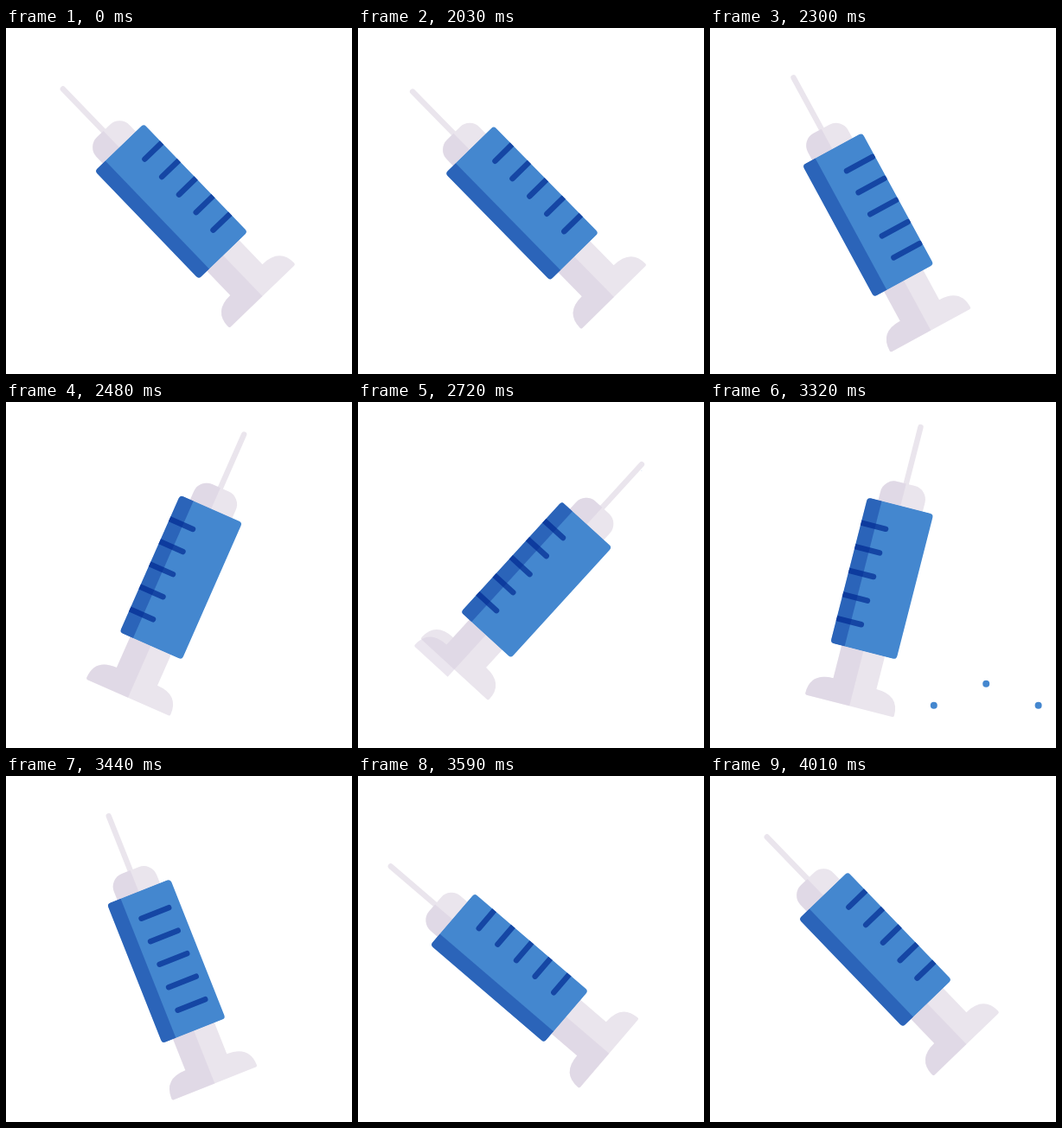
Write an HTML page that moves like this. It is 400 by 400 pixels and loops after 4040 ms.

```html
<!DOCTYPE html>
<html lang="en">
<head>
<meta charset="utf-8">
<title>Syringe</title>
<style>
html, body { margin: 0; width: 100%; height: 100%; overflow: hidden; background: #fff; }
svg { display: block; width: 100vw; height: 100vh; }
.light { fill: #eae5ed; }
.tint { fill: rgba(216, 205, 223, .5); }
.blue { fill: #4487cf; }
</style>
</head>
<body>
<svg viewBox="0 0 400 400">
  <defs>
    <clipPath id="barrel"><rect x="-39.3" y="-86.6" width="78.6" height="173.2" rx="4"/></clipPath>
  </defs>
  <path id="drop" class="blue" d="M0 -64.5C3 -53 13.2 -33 13.2 -17C13.2 -6 8 0 0 0S-13.2 -6 -13.2 -17C-13.2 -33 -3 -53 0 -64.5Z"/>
  <g id="splash" class="blue"><circle/><circle/><circle/></g>
  <g id="syringe">
    <path d="M0 -180.5V-105" stroke="#eae5ed" stroke-width="6.4" stroke-linecap="round"/>
    <path class="light" d="M-26.5 -80V-97a16 16 0 0 1 16 -16h21a16 16 0 0 1 16 16V-80Z"/>
    <path class="tint" d="M0 -80H-26.5V-97a16 16 0 0 1 16 -16H0Z"/>
    <path id="plunger" class="light" d="M-26 60H25.5V125.5Q53 125.5 53 150q0 2 -2 2H-51q-2 0 -2 -2Q-53 125.5 -26 125.5Z"/>
    <path class="tint" d="M0 60V152H-51q-2 0 -2 -2Q-53 125.5 -26 125.5V60Z"/>
    <g clip-path="url(#barrel)">
      <rect class="blue" x="-40" y="-87" width="80" height="174"/>
      <path id="marks" stroke="#1546a4" stroke-width="6.5" stroke-linecap="round"
        d="M-17 -57h34M-17 -28.5h34M-17 0h34M-17 28.5h34M-17 57h34"/>
      <rect x="-40" y="-87" width="17.6" height="174" fill="rgba(0, 43, 148, .37)"/>
    </g>
  </g>
</svg>
<script>
const LOOP = 4040, HOLD = 2030, STEP = 30;
const REST = [191, 200.5, -43.9];
const $ = id => document.getElementById(id);
const dots = [...$('splash').children];
const clamp = v => Math.max(0, Math.min(1, v));
const smooth = v => v * v * (3 - 2 * v);
const ramp = (t, from, to) => clamp((t - from) / (to - from));
const ease = (t, from, to) => smooth(ramp(t, from, to));
const place = (el, x, y, rest = '') => el.setAttribute('transform', `translate(${x} ${y}) ${rest}`);
const show = (el, on) => el.setAttribute('visibility', on ? 'visible' : 'hidden');

// s = 0: leaning far left, s = 1: pointing right
const swingPose = s => [
  174.8 + 34.5 * Math.min(s, .91),
  222 - 25.9 * Math.min(s, .745) + 13.4 * Math.max(0, s - .798),
  -49.7 + 92.1 * s
];

function drawSyringe(t) {
  const swing = ease(t, 2160, 2610) - ease(t, 3155, 3605);
  const away = ease(t, 2000, 2160) - ease(t, 3605, 4010);
  const [x, y, angle] = swingPose(swing).map((v, i) => REST[i] + (v - REST[i]) * away);
  place($('syringe'), x, y, `rotate(${angle})`);
  place($('marks'), 29 - 56 * smooth(clamp((swing - .1) / .5)), .5);
  place($('plunger'), 0, -11.5 * (ease(t, 2570, 2730) - ease(t, 3050, 3200)));
}

function drawDrop(t) {
  const age = t - 2718;
  show($('drop'), age > 0 && t < 3110);
  place($('drop'), 328 - age * .02, 80 + .00216 * age * age, `scale(${clamp(age / 150)})`);
}

function drawSplash(t) {
  const p = ramp(t, 3100, 3440), out = 1 - (1 - p) ** 2;
  show($('splash'), p > 0 && p < 1);
  dots.forEach((dot, i) => {
    const side = i - 1;
    place(dot, 319.2 + side * 69 * out, 384 - (side ? 38 : 66.5) * out);
    dot.setAttribute('r', 4 * (1 - ramp(p, .75, 1)));
  });
}

function frame(now) {
  const ms = now % LOOP;
  const t = ms < HOLD ? 0 : HOLD + Math.floor((ms - HOLD) / STEP) * STEP;
  drawSyringe(t);
  drawDrop(t);
  drawSplash(t);
  requestAnimationFrame(frame);
}
frame(0);
</script>
</body>
</html>
```
